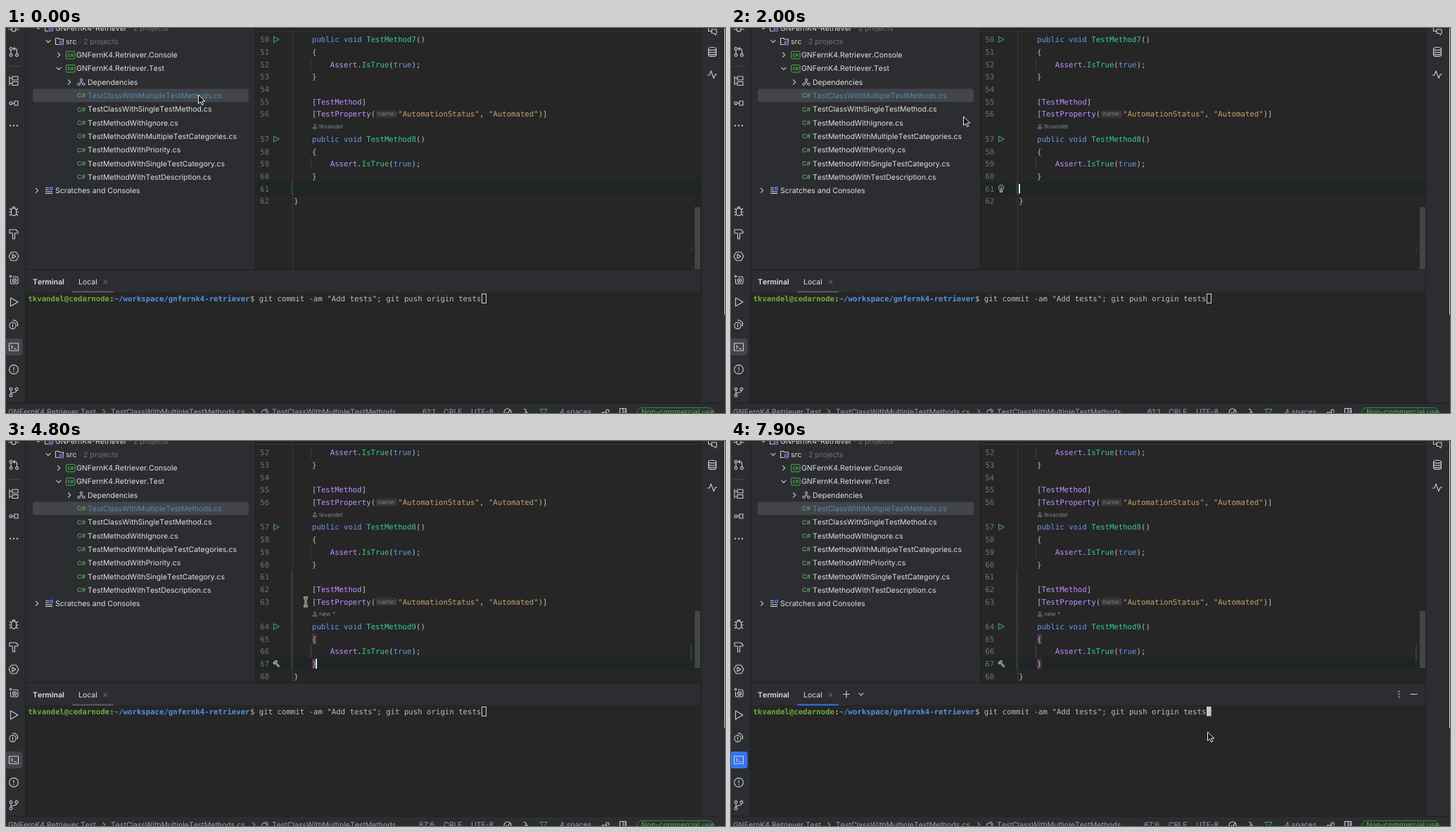
Recreate the animation shown at these times as an HTML page. Size 1022 by 548 pixels, loop 8000 ms.

```html
<!DOCTYPE html>
<html lang="en">
<head>
<meta charset="utf-8">
<title>Editor session</title>
<style>
  html, body { margin: 0; width: 100%; height: 100%; overflow: hidden; background: #2b2d30; }
  svg { display: block; width: 100vw; height: 100vh; }
  text { font: 10.5px Inter, "Open Sans", sans-serif; font-kerning: none; text-rendering: geometricPrecision; white-space: pre; }
  .mono { font: 10.68px "DejaVu Sans Mono", "Noto Sans Mono", monospace; }
  .bold { font-weight: 700; }
  .semi { font-weight: 600; }
  .lens { font-size: 8.4px; }
  .hint { font-size: 9px; }
  .cs { font-size: 8.7px; font-weight: 600; }
  .csbox { font-size: 6.3px; font-weight: 700; }
</style>
</head>
<body>
<svg id="stage" viewBox="0 0 1022 548" preserveAspectRatio="none"></svg>
<script>
const LOOP = 8000, STEP = 100;
const CW = 6.432, ROW = 17.69, COL0 = 409.3;
const C = {
  panel: '#2b2d30', editor: '#262626', line: '#1e1f22', text: '#dfe1e5', dim: '#6f737a',
  status: '#a0a3aa', icon: '#ced0d6', green: '#57a05d', blue: '#3574f0', code: '#bdbdbd',
  key: '#6c95eb', type: '#c191ff', call: '#39cc8f', str: '#c9a26d'
};
const PRODUCT = 'GNFernK4', USER = 'tkvandel';
const SUITE = PRODUCT + '-Retriever', TESTS = PRODUCT + '.Retriever.Test';
const CLASS = 'TestClassWithMultipleTestMethods';

// Markup helpers
const text = (x, y, s, fill = C.text, cls = '', anchor = 'start') =>
  `<text x="${x}" y="${y}" fill="${fill}" class="${cls}" text-anchor="${anchor}">${s}</text>`;
const rect = (x, y, w, h, fill, more = '') =>
  `<rect x="${x}" y="${y}" width="${w}" height="${h}" fill="${fill}" ${more}/>`;
const icon = (x, y, d, stroke = C.icon, fill = 'none', w = 1.1) =>
  `<path transform="translate(${x} ${y})" d="${d}" fill="${fill}" stroke="${stroke}" stroke-width="${w}" stroke-linejoin="round"/>`;
const ring = (x, y, r) => `M${x - r} ${y}a${r} ${r} 0 1 0 ${2 * r} 0a${r} ${r} 0 1 0 ${-2 * r} 0`;
const during = (spans, body) => `<g data-on="${spans}">${body}</g>`;
const rowY = r => 16.4 + ROW * r;

const RIGHT = 'M-1.8-3.4L1.7 0L-1.8 3.4', DOWN = 'M-3.4-1.8L0 1.7L3.4-1.8';

// Project tree
function tree() {
  const y = k => 19 + 19.3 * k;
  const label = (x, k, s, fill) => text(x, y(k) + 3.8, s, fill);
  const folder = (x, cy) =>
    icon(x, cy, 'M-5.5-4.5H-1.5L0-3H5.5V0M-5.5-4.5V4.5H-.5') +
    icon(x + 3, cy + 2.5, 'M-2.5-2.5H2.5V2.5H-2.5ZM-2.5 0H2.5', '#a88be0', '#3a3350', .9);
  const project = k => rect(85.5, y(k) - 5, 12.5, 10.5, '#253627', `rx="1.5" stroke="${C.green}"`) +
    text(91.8, y(k) + 2.6, 'C#', C.green, 'csbox', 'middle');
  const files = ['TestClassWithSingleTestMethod', 'TestMethodWithIgnore',
    'TestMethodWithMultipleTestCategories', 'TestMethodWithPriority',
    'TestMethodWithSingleTestCategory', 'TestMethodWithTestDescription'];
  const bar = fill => rect(38, 86.5, 307, 19, fill, 'rx="3.5"');
  let s = icon(46, y(-1), DOWN) + folder(61, y(-1)) + label(70, -1, SUITE) + label(175, -1, '· 2 projects', C.dim);
  s += icon(60, y(0), DOWN) + folder(76, y(0)) + label(85, 0, 'src') + label(104, 0, '· 2 projects', C.dim);
  s += icon(75, y(1), RIGHT) + project(1) + label(100, 1, PRODUCT + '.Retriever.Console');
  s += icon(75, y(2), DOWN) + project(2) + label(100, 2, TESTS);
  s += icon(90, y(3), RIGHT) + label(116, 3, 'Dependencies') +
    icon(107, y(3), ring(0, -3, 1.7) + ring(-3.4, 3, 1.7) + ring(3.4, 3, 1.7) + 'M0-1.2V.5L-2.4 1.8M0 .5L2.4 1.8', C.icon, 'none', 1);
  s += during('0 900 1200 8000', bar('#43454a') + label(116, 4, CLASS + '.cs', '#548aaf'));
  s += during('900 1200', bar('#2e436e') + label(116, 4, CLASS + '.cs'));
  files.forEach((f, i) => s += label(116, 5 + i, f + '.cs'));
  for (let k = 4; k < 11; k++) s += text(101, y(k) + 3.1, 'C#', C.green, 'cs');
  s += icon(44, y(11), RIGHT) + label(70, 11, 'Scratches and Consoles') +
    icon(61, y(11), 'M-5-4H0M-5-1.3H0M-5 1.4H5M-5 4.1H5') + icon(64.5, y(11) - 3, ring(0, 0, 2), '#548af7', '#2f4a80');
  return s;
}

// Code
const ASSERT = '        Assert.IsTrue(true);';
const PROP = '    [TestProperty(~"AutomationStatus", "Automated")]';
const method = (n, who) =>
  ['    [TestMethod]', PROP, '@' + who, `    public void TestMethod${n}()`, '    {', ASSERT, '    }'];
const base = [...method(7, USER).slice(3), '', ...method(8, USER), ''];
const fresh = method(9, 'new *');
const noLens = fresh.filter(r => r[0] !== '@');

function tint(word, plain) {
  if (/^(public|void|true)$/.test(word)) return C.key;
  if (word[0] === '"') return C.str;
  if (plain) return C.code;
  if (/^(TestMethod|TestProperty|Assert)$/.test(word)) return C.type;
  if (/^(TestMethod\d|IsTrue)$/.test(word)) return C.call;
  return C.code;
}

function codeLine(row, y, plain) {
  let x = COL0, s = '';
  for (const part of row.split(/("[^"]*"|\w+|~)/)) {
    if (part === '~') {
      s += rect(x + .6, y - 5.6, 30.4, 11.2, '#343537', 'rx="2.5"') + text(x + 3, y + 2.9, 'name:', '#7a7d83', 'hint');
      x += 32.2;
      continue;
    }
    const body = part.trim();
    const lead = part.length - part.trimStart().length;
    if (body) s += text((x + lead * CW).toFixed(2), y + 3.9, body, tint(body, plain), 'mono');
    x += part.length * CW;
  }
  return s;
}

function code(rows, top, plainFrom = Infinity) {
  let num = 50, s = '';
  rows.forEach((row, i) => {
    const y = rowY(i - top), lens = row[0] === '@';
    if (!lens) num++;
    if (i < top) return;
    if (lens) {
      s += icon(439, y, ring(0, -1.8, 1.3) + 'M-2.5 3V1.2H2.5V3Z', '#868a91', 'none', .9) +
        text(445, y + 2.9, row.slice(1), '#83868c', 'lens');
      return;
    }
    s += text(361.3, y + 3.9, num - 1, C.dim, 'mono');
    if (row === ASSERT) s += rect(433, y - ROW / 2, 1, ROW, num > 66 ? '#5f4260' : '#3b3c3d');
    if (row.includes('void') && (!i || rows[i - 1][0] === '@'))
      s += icon(384, y, 'M-3.5-4.2L4.3 0L-3.5 4.2Z', C.green, '#253627', 1);
    s += codeLine(row, y, i >= plainFrom);
  });
  return s;
}

const caretRow = r => rect(355, rowY(r) - ROW / 2, 633, ROW, '#1f2424');
const mark = (a, b) =>
  `<path d="M405.8 ${rowY(a) - ROW / 2}V${rowY(b) + ROW / 2}" stroke="#2a5233" stroke-width="2" stroke-dasharray="1.6 .9"/>`;
const bulb = r => icon(384, rowY(r), ring(0, -1.5, 3.6) + 'M-1.8 2.5V5H1.8V2.5M-1.8 3.7H1.8M-1.2-2L0-.5L1.2-2M0-.5V2', '#b4b6ba', 'none', 1);
const thumb = (y, h) => rect(979, y, 8, h, '#444546');

function editor() {
  const brace = r => rect(435, rowY(r) - 7.5, 6.6, 15, '#4b2f49');
  const clean = noLens.map(r => r.replace('~', ''));
  const first = base.length;
  let s = rect(354, 0, 634, 344, C.editor) + rect(354, 0, 1, 344, C.line) + rect(355, 4.3, 633, 1, '#393b40');
  s += during('0 4100', caretRow(12)) + during('4100 8000', caretRow(17) + brace(15) + brace(17));
  s += rect(407, 5, 1, 339, '#393b3d');
  s += '<g clip-path="url(#pane)">';
  s += during('0 4100', code([...base, '}'], 0) + mark(12, 12) + thumb(255, 89) + rect(973, 312, 1.5, 4, '#3f4441'));
  s += during('4100 4800', mark(11, 17) + thumb(240, 83) + rect(973, 291, 1.5, 23, '#2c5236'));
  s += during('4100 4300', code([...base, ...clean, '}'], 1, first));
  s += during('4300 4400', code([...base, ...clean, '}'], 1));
  s += during('4400 4800', code([...base, ...noLens, '}'], 1));
  s += during('4800 8000', code([...base, ...fresh, '}'], 2) + mark(10, 17) + thumb(242, 81) +
    rect(973, 291, 1.5, 23, '#2c5236') +
    icon(384, rowY(17), 'M-4.5-1.5L-1-4.8L2.2-3.8L.5-1.8L5 3.5L3.6 5L-1.3-.2L-3 1Z', '#a9abb0', '#8b8d92', .7));
  s += '</g>';
  s += during('1500 4100', bulb(12)) + during('4100 4200', bulb(11));
  s += during('1200 4100', rect(409, 222, 1.8, 13.6, '#fff'));
  s += during('4100 5700 6000 7700', rect(440.3, 310, 1.7, 14, '#fff'));
  return s;
}

// Tool strips on both sides
function strips() {
  const x = 11;
  const play = 'M-2-3L3 0L-2 3Z';
  const left = [
    [2, ring(0, 0, 3) + 'M-7.5 0H-3M3 0H7.5'],
    [34, ring(-4, -4.5, 1.9) + ring(-4, 4.5, 1.9) + ring(4.5, 4.5, 1.9) + 'M-4-2.5V2.5M4.5 2.5V-2Q4.5-4.5 2-4.5H-.5M1.7-6.7L-.5-4.5L1.7-2.3'],
    [75, 'M-6-6.5V6.5M-6-3.5H-2M-6 4H-2M-2-6H6V-1H-2ZM-2 1.5H6V6.5H-2Z'],
    [107, ring(-4, 0, 2) + 'M-2 0H1M1-3H6V3H1Z'],
    [139, [-5, 0, 5].map(d => ring(d, 0, .6)).join('')],
    [261, 'M-3.6-1a3.6 3.6 0 0 1 7.2 0V2.5a3.6 3.6 0 0 1-7.2 0ZM-3.6 1H-6.8M3.6 1H6.8M-3.4-2L-6-4M3.4-2L6-4M-3.3 3.5L-6 6M3.3 3.5L6 6M-2-4.5a2 2 0 0 1 4 0'],
    [293, 'M-6-6H3L6-3V-1H1.5V7H-1.5V-1H-6Z'],
    [325, 'M-3.5-6H3.5L7 0L3.5 6H-3.5L-7 0Z' + play],
    [358, ring(1, 1.3, 2.6) + ring(1, 1.3, .5) + ring(-4.5, -4.5, 1.2) + 'M-1.5-4H4Q6-4 6-2V4Q6 6 4 6H-2.5Q-4.5 6-4.5 4V-1'],
    [390, 'M-4.5-6L6 0L-4.5 6Z'],
    [422, ring(-1.5, 1.5, 4.6) + 'M-1.5-6a6 6 0 0 1 6.5 8.5M-1.5-1V4'],
    [486, ring(0, 0, 6.4) + 'M0-3.5V1M0 2.3V3.8'],
    [518, ring(-4, -4, 1.9) + ring(4, -4, 1.9) + ring(-4, 5, 1.9) + 'M-4-2V3M4-2Q4 1-4 1.5']
  ];
  const box = fill => rect(-1, 442, 24.5, 24, fill, 'rx="4"');
  let s = rect(0, 0, 28, 534, C.panel) + rect(27.3, 0, 1, 534, C.line) + rect(2, 54, 18, 1, '#43454a');
  s += during('0 7900', box('#43454a')) + during('7900 8000', box(C.blue));
  s += icon(x, 454, 'M-6.5-5.2H6.5V5.2H-6.5ZM-3.8-2.3L-1.5 0L-3.8 2.3M.3 2.5H3.8');
  for (const [y, d] of left) s += icon(x, y, d);
  s += rect(988, 0, 34, 534, C.panel) + rect(987.3, 0, 1, 534, C.line) + rect(1021, 0, 1, 408, '#d0d2d5');
  s += icon(1004, 3, 'M-5.5-4V1.5H0M-1-1H6V4.5L4.5 7L2.5 4.5H-1Z');
  s += icon(1004, 34, 'M-5.5-4.5a5.5 2 0 0 1 11 0V4.5a5.5 2 0 0 1-11 0ZM-5.5-4.5a5.5 2 0 0 0 11 0M-5.5-1.2a5.5 2 0 0 0 11 0M-5.5 1.9a5.5 2 0 0 0 11 0');
  s += icon(1004, 66, 'M-7 1H-4L-2-5L2 5.5L4.2 0H7');
  return s;
}

// Terminal panel
function terminal() {
  const y = 388.8, x0 = 31.4, adv = 6.44;
  const put = (col, s, fill, cls) => text((x0 + col * adv).toFixed(2), y, s, fill, 'mono ' + cls);
  const under = fill => rect(94, 374.6, 59, 2, fill, 'rx="1"');
  let s = rect(28, 344, 960, 32, C.panel) + rect(28, 343.6, 960, 1, C.line) + rect(28, 376, 960, 158, C.editor);
  s += text(38, 364.8, 'Terminal', '#dfe1e5', 'semi') + text(103, 364.8, 'Local', '#dfe1e5');
  s += icon(141.5, 361.3, 'M-2.8-2.8L2.8 2.8M2.8-2.8L-2.8 2.8', '#868a91', 'none', .9);
  s += during('0 7900', under('#5a5d63')) + during('7900 8000', under(C.blue));
  s += during('7100 8000', icon(164, 360.5, 'M-5 0H5M0-5V5') + icon(185, 360.5, DOWN) +
    icon(949.5, 360.5, [-4, 0, 4].map(d => ring(0, d, .4)).join('')) + icon(970.5, 360.5, 'M-5 0H5'));
  s += put(0, USER + '@cedarnode', '#70ab3e', 'bold') + put(18, ':', C.code, 'bold');
  s += put(19, '~/workspace/gnfernk4-retriever', '#5590e2', 'bold') + put(49, '$', C.code, '');
  'git commit -am "Add tests"; git push origin tests'.replace(/\S+/g, (w, at) => s += put(51 + at, w, C.code, ''));
  s += during('0 7900', rect(676.5, 378.5, 6, 13, 'none', `stroke="${C.icon}"`));
  s += during('7900 8000', rect(676, 378, 6.6, 13.6, '#c6c8cb'));
  return s;
}

// Status bar
function statusBar() {
  const y = 549.6, cy = 546;
  const word = (x, s, anchor) => text(x, y, s, C.status, '', anchor);
  const sep = x => icon(x, cy, RIGHT, '#8b8e94');
  let s = rect(0, 534, 1022, 14, C.panel) + rect(0, 533.5, 1022, 1, C.line);
  s += during('0 900 1500 8000', word(3, TESTS) + sep(139) + word(149, CLASS + '.cs') + sep(352) +
    icon(368, cy, ring(-1, 1, 3.4) + 'M0-4a4.2 4.2 0 0 1 4 5.5', C.status) + word(378, CLASS));
  s += during('900 1500', word(6, SUITE) + sep(118) + word(128, 'src') + sep(153) + word(163, TESTS) + sep(299) +
    text(309, y - .4, 'C#', C.green, 'cs') + word(325, CLASS + '.cs'));
  s += during('0 4200', word(610, '61:1', 'end')) + during('4200 8000', word(609, '67:6', 'end'));
  s += word(622, 'CRLF') + word(661, 'UTF-8') + word(787, '4 spaces');
  s += icon(713, cy + 1, ring(0, 0, 5) + 'M-2 0L0 2L4-4') + icon(739, cy, 'M-3-3.5Q0-4 .5 0L4 4M.5 0L-3 4');
  s += icon(764, cy, 'M-5-3.5H5L0 4.5Z', C.green, '#253627', 1);
  s += icon(852, cy + 1, 'M-4.5 0H2V5H-4.5ZM1 0V-2a2 2 0 0 1 4 0V0') + icon(877, cy, 'M-4.5-4.5H4.5V4.5H-4.5ZM0-4.5V4.5M1.5-2H4.5M1.5 .5H4.5');
  s += rect(896.5, 540.5, 109, 15, '#253627', 'rx="7" stroke="#4a7a51"') + text(903, y, 'Non-commercial use', '#6aa572');
  return s;
}

const pointer =
  `<g id="arrow">${icon(0, 0, 'M0 0V12.6L3 10L5.1 14.6L7.2 13.7L5.2 9.2H9.2Z', '#f2f2f2', '#151515', 1)}</g>` +
  `<g id="beam">${icon(0, 0, 'M-3-6H3M0-6V6M-3 6H3', '#f4f4f4', 'none', 2.8)}${icon(0, 0, 'M-2.6-6H2.6M0-6V6M-2.6 6H2.6', '#111', 'none', 1)}</g>`;

const stage = document.getElementById('stage');
stage.innerHTML = '<clipPath id="pane"><rect x="355" y="5" width="633" height="339"/></clipPath>' +
  rect(0, 0, 1022, 548, C.panel) + tree() + editor() + terminal() + strips() + statusBar() + pointer;

// Pointer path: time, x, y
const PATH = [
  [0, 273.5, 95], [1700, 273.5, 95], [1800, 286, 104], [2000, 330.5, 126], [2200, 364, 148],
  [2500, 397, 206], [2600, 409, 224], [2700, 426, 229], [6500, 426, 229], [6600, 431, 233],
  [6800, 474, 268], [7000, 556, 330], [7100, 594, 360], [7200, 618, 376.5], [7300, 618, 376.5],
  [7400, 653, 400], [7500, 677.5, 414], [LOOP, 677.5, 414]
];

function pointerAt(t) {
  const i = PATH.findIndex(p => p[0] > t);
  const [t0, x0, y0] = PATH[i - 1], [t1, x1, y1] = PATH[i];
  const k = (t - t0) / (t1 - t0);
  return [x0 + (x1 - x0) * k, y0 + (y1 - y0) * k];
}

const timed = [...stage.querySelectorAll('[data-on]')].map(g => [g, g.dataset.on.split(' ').map(Number)]);
const arrow = document.getElementById('arrow'), beam = document.getElementById('beam');
const show = (el, on) => { el.style.display = on ? '' : 'none'; };

function draw(t) {
  // An odd number of passed edges means the span is open
  for (const [g, edges] of timed) show(g, edges.filter(e => e <= t).length % 2);
  const [x, y] = pointerAt(Math.floor(t / STEP) * STEP);
  const inCode = x > 407 && y < 344;
  show(beam, inCode);
  show(arrow, !inCode);
  (inCode ? beam : arrow).setAttribute('transform', `translate(${x} ${y})`);
}

const start = performance.now();
function tick() {
  draw((performance.now() - start) % LOOP);
  requestAnimationFrame(tick);
}
tick();
</script>
</body>
</html>
```
